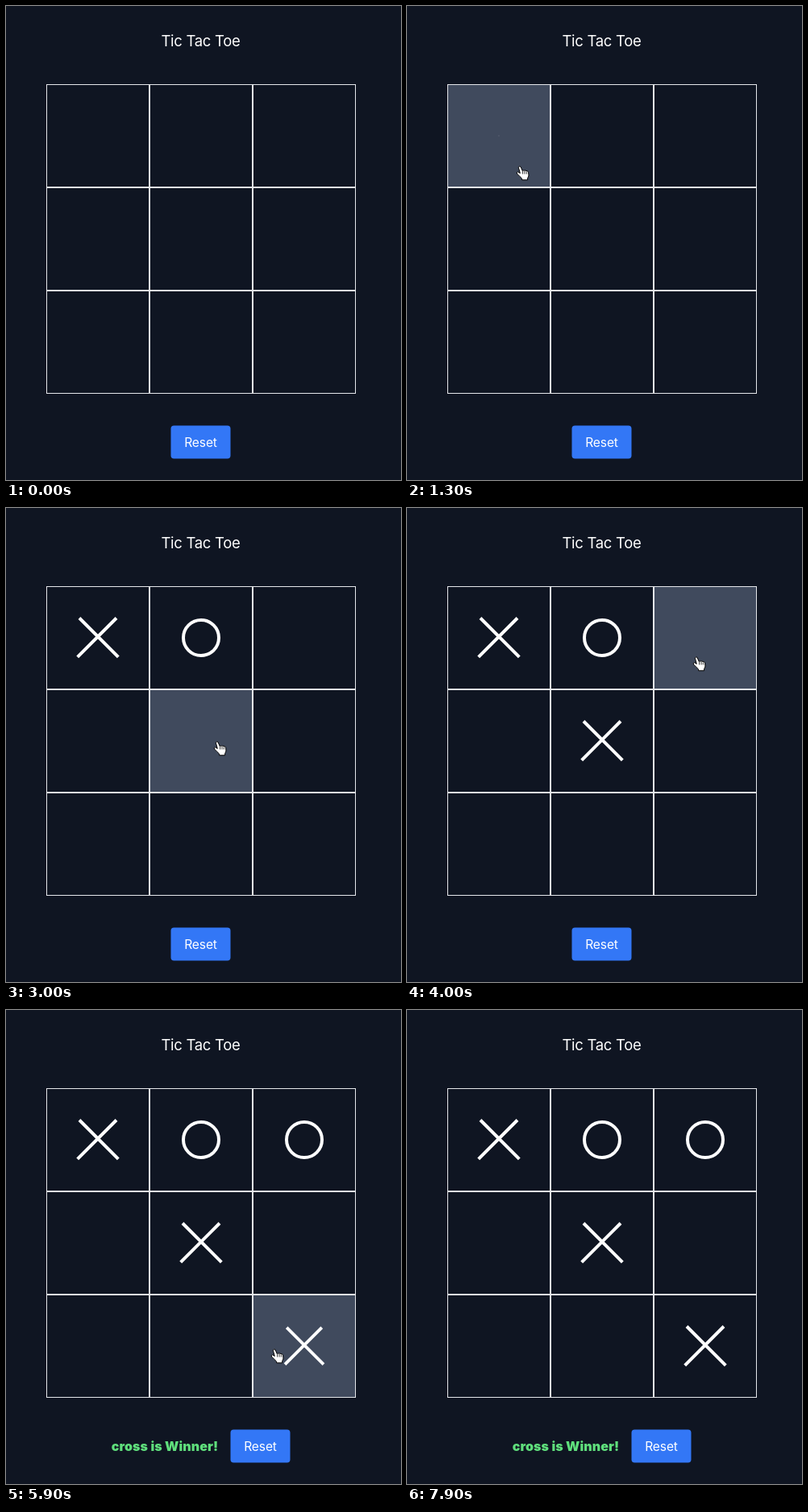
Write an HTML page that moves like this. It is 490 px wide and 588 px high and loops after 8 s.

```html
<!DOCTYPE html>
<html lang="en">
<head>
<meta charset="utf-8">
<title>Tic Tac Toe</title>
<style>
  html, body { margin: 0; width: 100%; height: 100%; overflow: hidden; background: #0f1522; }
  svg { display: block; width: 490px; height: 588px; font-family: Inter, "Open Sans", sans-serif; }
  text { fill: #fff; text-anchor: middle; }
  .title { font-size: 18.5px; letter-spacing: -.28px; }
  .label { font-size: 15.6px; letter-spacing: -.12px; }
  .winner { font-size: 16px; font-weight: 900; letter-spacing: .1px; fill: #5fdf7c; }
  .cell { fill: #404a5d; fill-opacity: 0; stroke: #e5e7eb; }
  .mark { fill: none; stroke: #fff; stroke-width: 4; }
</style>
</head>
<body>
<svg viewBox="0 0 490 588">
  <text class="title" x="241.5" y="50">Tic Tac Toe</text>
  <g id="board"></g>
  <text id="winner" class="winner" x="197" y="547">cross is Winner!</text>
  <g id="reset">
    <rect x="204.5" y="520.5" width="74" height="41" rx="4" fill="#3377f6"/>
    <text class="label" x="241.5" y="547">Reset</text>
  </g>
  <g id="hand" stroke="#000" stroke-linejoin="round">
    <path fill="#fff" d="M-1.7 1.2Q-1-1 1 .3L3.2 5.5Q4.2 4.5 5.6 5.3Q6.8 4.5 8 5.6Q10 5.2 10.5 7.2L11 11Q10.7 13 9.6 14.5V16.8H2.6V15Q0 12.6-3.5 9Q-4.4 7-2.4 6.8L.3 8.4Z"/>
    <path fill="none" stroke-width=".8" d="M3.6 6V9.5M6 6V9.5M8.3 6.5V9.5"/>
  </g>
</svg>
<script>
const LOOP = 8000, STEP = 100, FADE = 300, GROW = 500, TRAVEL = 300;
const SIZE = 128, LEFT = 50, TOP = 97;
const clicks = [1250, 2025, 2980, 4010, 5540];
const win = clicks[clicks.length - 1];

// Fingertip: where it starts, then each stop and when it sets off there
const start = { x: 298, y: 490 };
const stops = [
  { x: 179, y: 213, at: 250 },
  { x: 140, y: 199, at: 600 },
  { x: 256, y: 187, at: 1500 },
  { x: 262, y: 290, at: 2450 },
  { x: 359, y: 185, at: 3400 },
  { x: 278, y: 450, at: 4400 },
  { x: 333, y: 421, at: 5145 },
  { x: 335, y: 500, at: 6200 }
];

const $ = id => document.getElementById(id);

// cubic-bezier(.4, 0, .2, 1)
function ease(x) {
  if (x <= 0) return 0;
  if (x >= 1) return 1;
  let lo = 0, hi = 1;
  for (let i = 0; i < 20; i++) {
    const s = (lo + hi) / 2, r = 1 - s;
    if (1.2 * s * r * r + .6 * s * s * r + s ** 3 < x) lo = s; else hi = s;
  }
  return lo * lo * (3 - 2 * lo);
}

function tipAt(t) {
  let { x, y } = start;
  for (const stop of stops) {
    const k = ease((t - stop.at) / TRAVEL);
    x += (stop.x - x) * k;
    y += (stop.y - y) * k;
  }
  return { x, y };
}

function cellAt({ x, y }) {
  const col = Math.floor((x - LEFT) / SIZE), row = Math.floor((y - TOP) / SIZE);
  return col < 0 || col > 2 || row < 0 || row > 2 ? -1 : row * 3 + col;
}

// Hover spans follow from the pointer's route
const visits = [];
let visit = { cell: -1 };
for (let t = 0; t < LOOP; t += 2) {
  const cell = cellAt(tipAt(t));
  if (cell === visit.cell) continue;
  visit.end = t;
  visit = { cell, start: t, end: LOOP };
  visits.push(visit);
}

function add(tag, attrs) {
  const el = document.createElementNS("http://www.w3.org/2000/svg", tag);
  for (const name in attrs) el.setAttribute(name, attrs[name]);
  return $("board").appendChild(el);
}

const corner = i => ({ x: LEFT + i % 3 * SIZE, y: TOP + Math.floor(i / 3) * SIZE });

const cells = Array.from({ length: 9 }, (_, i) => {
  const { x, y } = corner(i);
  return add("rect", { class: "cell", x: x + .5, y: y + .5, width: SIZE - 1, height: SIZE - 1 });
});

// Crosses and noughts take turns in the clicked cells
const marks = clicks.map((at, turn) => {
  const { x, y } = corner(cellAt(tipAt(at)));
  const el = turn % 2
    ? add("circle", { class: "mark", r: 22 })
    : add("path", { class: "mark", d: "M-23-24.5L25.3 23.8M23-24.5L-25.3 23.8" });
  return { el, at, x: x + SIZE / 2, y: y + SIZE / 2 };
});

function show(el, on) { el.style.display = on ? "" : "none"; }

function draw(t) {
  cells.forEach((el, i) => {
    const levels = visits.filter(v => v.cell === i)
      .map(v => ease((t - v.start) / FADE) * (1 - ease((t - v.end) / FADE)));
    el.style.fillOpacity = Math.max(0, ...levels);
  });
  for (const { el, at, x, y } of marks) {
    const k = ease((t - at) / GROW);
    show(el, k > 0);
    el.setAttribute("transform", `translate(${x} ${y}) scale(${k})`);
  }
  const won = t >= win, tip = tipAt(t);
  show($("winner"), won);
  $("reset").setAttribute("transform", `translate(${won ? 74 : 0} 0)`);
  show($("hand"), cellAt(tip) >= 0);
  $("hand").setAttribute("transform", `translate(${tip.x} ${tip.y})`);
}

let origin;
function tick(now) {
  origin ??= now;
  draw(Math.floor((now - origin) % LOOP / STEP) * STEP);
  requestAnimationFrame(tick);
}
draw(0);
requestAnimationFrame(tick);
</script>
</body>
</html>
```
